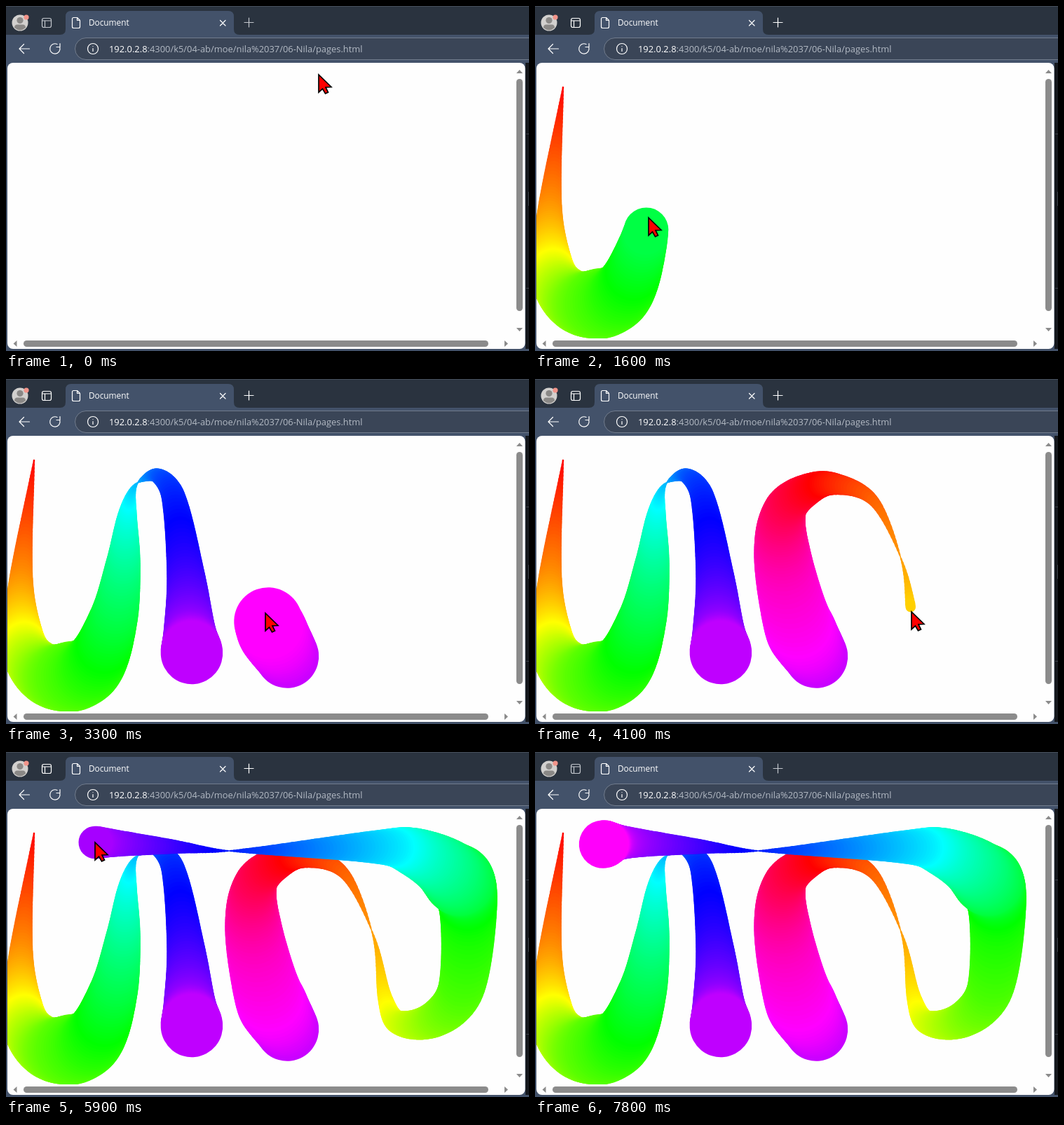
Write an HTML page with a canvas that moves like this. It is 746 by 492 pixels and loops after 7.9 s.

```html
<!DOCTYPE html>
<html lang="en">
<head>
<meta charset="utf-8">
<title>Document</title>
<style>
  html, body { margin: 0; width: 100%; height: 100%; overflow: hidden; background: #43526a; }
  #stage { position: relative; width: 746px; height: 492px; overflow: hidden; }
  svg, canvas { position: absolute; left: 0; top: 0; display: block; }
  canvas { left: 2px; top: 81px; border-top-left-radius: 8px; }
  text { font-family: "Open Sans", "Noto Sans", sans-serif; }
  .line { fill: none; stroke: #fff; stroke-width: 1.2; stroke-linecap: round; stroke-linejoin: round; }
  .bar { fill: #8b8b8b; }
</style>
</head>
<body>
<div id="stage">
  <svg width="746" height="492" viewBox="0 0 746 492">
    <!-- title bar and tab -->
    <rect width="746" height="41" fill="#2a333f"/>
    <rect width="746" height="1" fill="#454e5a"/>
    <rect y="41" width="746" height="451" fill="#43526a"/>
    <path d="M77 41Q85 41 85 33V15Q85 7 93 7H317Q325 7 325 15V33Q325 41 333 41Z" fill="#43526a"/>
    <circle cx="20" cy="24" r="11.5" fill="#d2d0ce"/>
    <circle cx="20" cy="20.5" r="4.6" fill="#8a8886"/>
    <path d="M12 31Q12 26.5 16 26.5H24Q28 26.5 28 31Q24 34.5 20 34.5Q16 34.5 12 31Z" fill="#8a8886"/>
    <circle cx="29" cy="16" r="3.6" fill="#f1948a"/>
    <g id="tools" class="line">
      <rect x="51.5" y="17.5" width="13" height="13" rx="2.5"/>
      <path d="M51.5 21H64.5M55.5 21V30.5"/>
    </g>
    <path id="plus" class="line" d="M340 23.5H353M346.5 17V30"/>
    <path class="line" d="M96.5 16.5H101.5L105.5 20.5V29.5Q105.5 31.5 103.5 31.5H96.5Q94.5 31.5 94.5 29.5V18.5Q94.5 16.5 96.5 16.5ZM101.5 16.5V20.5H105.5"/>
    <text x="118" y="28" font-size="11.8" fill="#fff">Document</text>
    <path class="line" d="M305.5 20.5L313 28M313 20.5L305.5 28"/>

    <!-- toolbar -->
    <path class="line" d="M19 61H33.5M25.5 54.5L19 61L25.5 67.5"/>
    <path class="line" d="M76.8 59A7.2 7.2 0 1 1 73 54.5M77 53.5V58.5H72"/>
    <rect id="pill" x="98.5" y="45.5" width="680" height="31" rx="15.5" fill="#3a4557" stroke="#717c8d"/>
    <circle class="line" cx="124" cy="61" r="7.5"/>
    <path class="line" d="M124 60.5V64.5M124 57.5V57.6"/>
    <text x="147" y="66" font-size="12.9" fill="#b3bac4"><tspan fill="#fff">192.0.2.8</tspan>:4300/k5/04-ab/moe/nila%2037/06-Nila/pages.html</text>

    <!-- page -->
    <path d="M741 81H746V489H741Z" fill="#15181d"/>
    <path d="M742 182.5H746M742 402.5H746M745.5 265V285" stroke="#3c4148"/>
    <rect x="2" y="81" width="738.5" height="408" rx="8" fill="#fefefe"/>
    <g class="bar">
      <rect x="728" y="104" width="9" height="331" rx="4.5"/>
      <rect x="25" y="477" width="663" height="9" rx="4.5"/>
      <path d="M728 96L732.5 91L737 96ZM728 459L732.5 464L737 459ZM15.5 477L10.5 481.5L15.5 486ZM711 477L716 481.5L711 486Z"/>
    </g>
  </svg>
  <canvas id="paint" width="725" height="393"></canvas>
  <svg width="746" height="492" viewBox="0 0 746 492">
    <path id="cursor" d="M0 0V25L5.5 20L9.5 27L13.5 25L10 18L18 17.5Z" fill="#f00" stroke="#000" stroke-width="1.7"/>
  </svg>
</div>
<script>
const LOOP = 7900, STEP = 100;

// Key points of the two strokes: brush step, x, y.
const strokes = [
  [[0, 40, 116], [30, 22, 278], [50, 23, 352], [70, 34, 399], [90, 70, 425], [108, 121, 412],
   [130, 153, 342], [150, 167, 264], [172, 173, 195], [190, 181, 158], [203, 195, 143],
   [218, 218, 139], [230, 239, 169], [250, 256.5, 280], [270, 262, 360], [285, 265, 391]],
  [[286, 401, 395.5], [300, 374, 346], [316, 353, 252], [336, 356, 188], [350, 385, 160],
   [366, 427, 149.5], [382, 484, 175], [397, 524, 262], [415, 541, 352], [428, 560, 386],
   [446, 613, 380], [460, 650, 335], [478, 658.5, 216], [504, 632, 171], [526, 582, 143],
   [546, 535, 135.5], [594, 316, 141], [612, 238, 135], [638, 129.5, 129], [661, 97, 131.5]]
];

// time, brush step
const progress = [[600, 0], [2700, 285], [3200, 286], [4800, 504], [6080, 661]];

const $ = id => document.getElementById(id);
const ctx = $("paint").getContext("2d");
const clamp = (v, lo, hi) => Math.max(lo, Math.min(hi, v));
const mix = (a, b, k) => a + (b - a) * k;
const first = keys => keys[0];
const last = keys => keys[keys.length - 1];

// Index of the span that holds v.
function spanAt(keys, v) {
  const i = keys.findIndex(key => key[0] > v);
  return (i < 0 ? keys.length - 1 : Math.max(i, 1)) - 1;
}

function stepAt(t) {
  const i = spanAt(progress, t), a = progress[i], b = progress[i + 1];
  return mix(a[1], b[1], clamp((t - a[0]) / (b[0] - a[0]), 0, 1));
}

// Cubic Hermite curve through the key points.
function pointAt(keys, step) {
  const n = clamp(step, first(keys)[0], last(keys)[0]);
  const i = spanAt(keys, n), b = keys[i], c = keys[i + 1];
  const a = keys[i - 1] || b, d = keys[i + 2] || c;
  const span = c[0] - b[0], u = (n - b[0]) / span;
  return [1, 2].map(k => {
    const out = (c[k] - a[k]) / (c[0] - a[0]) * span;
    const into = (d[k] - b[k]) / (d[0] - b[0]) * span;
    const ease = u * u * (3 - 2 * u);
    return mix(b[k], c[k], ease) + u * (1 - u) * (out * (1 - u) - into * u);
  });
}

// The width swings between 1 and 100 by one per step.
const widthAt = n => 100.5 - Math.abs(99 - n % 198);

function paint(head) {
  ctx.setTransform(1, 0, 0, 1, 0, 0);
  ctx.clearRect(0, 0, 725, 393);
  ctx.translate(-2, -81);
  ctx.lineCap = "round";
  for (const keys of strokes) {
    const end = Math.min(head, last(keys)[0]);
    for (let n = first(keys)[0] + 1; n <= end; n++) {
      ctx.strokeStyle = `hsl(${n % 360}, 100%, 50%)`;
      ctx.lineWidth = widthAt(n);
      ctx.beginPath();
      ctx.moveTo(...pointAt(keys, n - 1));
      ctx.lineTo(...pointAt(keys, n));
      ctx.stroke();
    }
  }
}

function pointer(t, n) {
  const [one, two] = strokes;
  if (t < 600) {
    const left = 1 - Math.min(t / 400, 1);
    return [40 + 406 * left ** 2.4, 118 - 20 * left ** 5];
  }
  if (t > 2700 && t < 3200) {
    const k = clamp((t - 2800) / 400, 0, 1);
    return [1, 2].map(axis => mix(last(one)[axis], first(two)[axis], k));
  }
  if (t > 6100) {
    const k = clamp((t - 6100) / 600, 0, 1) ** 2;
    return [mix(97, 700, k), mix(132, 90, k)];
  }
  // The pointer runs ahead of the paint, less and less.
  return pointAt(t < 3000 ? one : two, n + 6 * (1 - t / 6000));
}

function draw(t) {
  const n = stepAt(t);
  paint(t < 600 ? -1 : Math.round(n));

  const [x, y] = pointer(t, n);
  $("cursor").setAttribute("transform", `translate(${Math.round(x)} ${Math.round(y)})`);
  $("cursor").style.display = t < 6800 ? "" : "none";

  const active = t >= 600 && t < 7800;
  $("tools").style.stroke = $("plus").style.stroke = active ? "#fff" : "#c3c7cd";
  $("pill").style.fill = t >= 6700 && t < 7500 ? "#3f4b5e" : "#3a4557";
}

const start = performance.now();
let shown = -1;
function tick() {
  const t = Math.floor((performance.now() - start) % LOOP / STEP) * STEP;
  if (t !== shown) draw(shown = t);
  requestAnimationFrame(tick);
}
tick();
</script>
</body>
</html>
```
